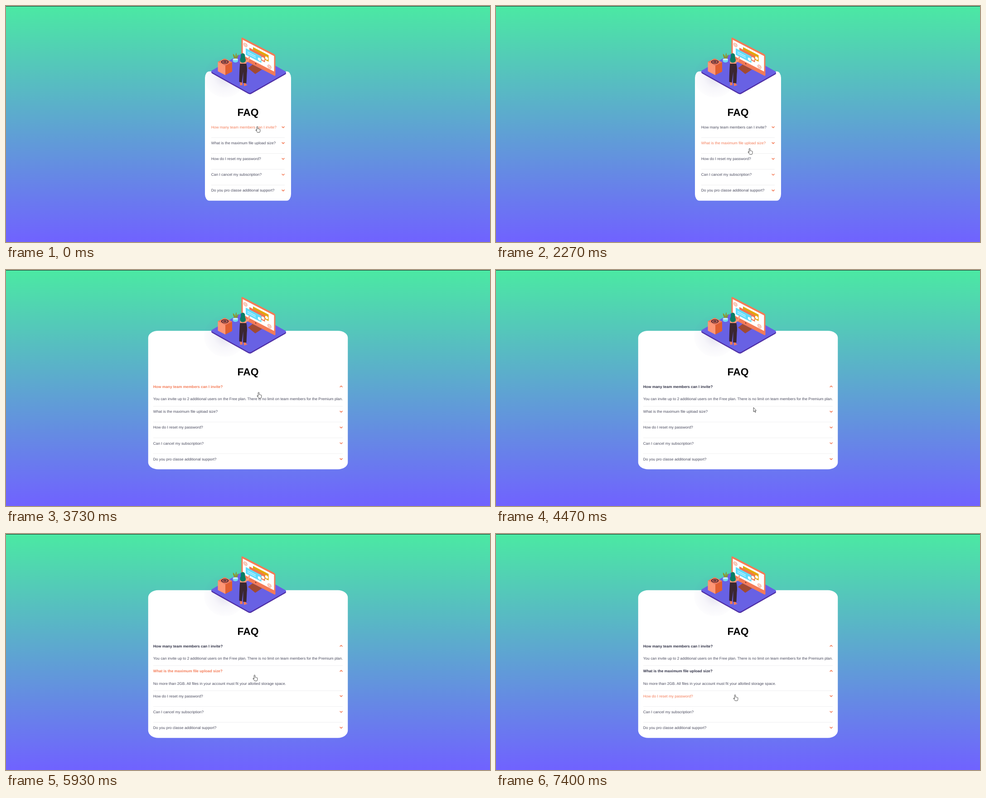
Write an HTML page that moves like this. It is 1068 px wide and 524 px high and loops after 8 s.

```html
<!DOCTYPE html>
<html lang="en">
<head>
<meta charset="utf-8">
<title>FAQ accordion</title>
<style>
  html, body { margin: 0; height: 100%; overflow: hidden; }
  svg { display: block; width: 100vw; height: 100vh; }
  text { font-family: "Liberation Sans", Arial, sans-serif; font-size: 8.36px; text-rendering: geometricPrecision; }
  .title { font-size: 22.8px; font-weight: bold; text-anchor: middle; }
  .question, .answer { fill: #4a4b5e; }
  .open { font-weight: bold; fill: #303146; }
  .hover { fill: #f47b56; }
  .rule { stroke: #e8e8ea; stroke-width: .7; }
  .chevron { fill: none; stroke: #f47b56; stroke-width: 1.6; }
  .at { fill: #f47b56; font-size: 10px; font-weight: bold; text-anchor: middle; }
  .cursor { fill: #fff; stroke: #222; stroke-width: .8; stroke-linejoin: round; }
  .skin { fill: #ff9b7b; }
</style>
</head>
<body>
<svg viewBox="0 0 1068 524" preserveAspectRatio="none">
  <defs>
    <linearGradient id="sky" x2="0" y2="1">
      <stop stop-color="#4be9a3"/><stop offset="1" stop-color="#7062ff"/>
    </linearGradient>
    <radialGradient id="shade">
      <stop stop-color="#4a3a94" stop-opacity=".16"/>
      <stop offset=".55" stop-color="#5a4aa4" stop-opacity=".05"/>
      <stop offset="1" stop-color="#5a4aa4" stop-opacity=".012"/>
    </radialGradient>
  </defs>
  <rect width="1068" height="524" fill="url(#sky)"/>
  <rect width="1068" height="1" fill="#1c2b28"/>
  <rect id="card" fill="#fff"/>

  <g id="art">
    <circle cx="483" cy="157" r="46" fill="url(#shade)"/>
    <g id="platform"></g>
    <path d="M534 138L544 130 565 141 550 151Z" fill="#a24a32"/>
    <g id="monitor" transform="matrix(1 .52 0 1 519.5 69)"></g>
    <!-- plant -->
    <path d="M505 118Q500 111 501 106Q505 109 506 114Q506 108 508 103.500Q510 109 508 114Q510 109 513 108Q512 114 508 119Z" fill="#8f942b"/>
    <path d="M500.500 118V123Q506 128 512 123V118Z" fill="#72d8f0"/>
    <ellipse cx="506.300" cy="118.500" rx="5.800" ry="2" fill="#c9f2fb"/>
    <!-- box -->
    <g id="box"></g>
    <!-- visitor -->
    <path d="M517 168H521L522 176H516ZM525 169H529V173L533 175.500 525 178Z" fill="#f47b56"/>
    <path d="M516.500 126H530Q533 138 531.500 150L530.500 171.500 523 171 523.500 146 520.500 170 514.500 168.500Q515 138 516.500 126Z" fill="#3b2631"/>
    <path class="skin" d="M516 120Q522 115 530 119L533 120 536 111.500 538.500 113 536 122.500 530 126V128H516.500Z"/>
    <path d="M518 110Q518 105 523 105Q528 106 527.500 112Q527 115 529 119Q530 126 522 126Q515 125 516.500 118Q518.500 114 518 110Z" fill="#087e66"/>
  </g>

  <text id="title" class="title" x="534">FAQ</text>
  <g id="list"></g>
  <path id="cursor" class="cursor"/>
</svg>

<script>
const LOOP = 8000, TICK = 200 / 3;
const HAND = "M-1.200 9V1.200a1.200 1.200 0 0 1 2.400 0V5.200q1.300-.8 1.900.4 1.300-.6 1.800.5 1.400-.3 1.400 1V9.600q0 2-1.100 3.600H.2Q-1 11.200-3.300 8.600q-.4-1.500 1-1.200z";
const ARROW = "M.3 .5V10L2.400 8 3.900 11.400 5.300 10.800 3.900 7.400H6.400Z";

const faq = [
  ["How many team members can I invite?", "You can invite up to 2 additional users on the Free plan. There is no limit on team members for the Premium plan."],
  ["What is the maximum file upload size?", "No more than 2GB. All files in your account must fit your allotted storage space."],
  ["How do I reset my password?"],
  ["Can I cancel my subscription?"],
  ["Do you pro classe additional support?"],
];

const start = { x: 554.5, y: 267.5 };
const moves = [
  { from: 0, to: 733, x: 556, y: 302 },
  { from: 1000, to: 1400, x: 560.5, y: 331 },
  { from: 1533, to: 1600, x: 560.5, y: 334 },
  { from: 2133, to: 3000, x: 557.5, y: 271.5 },
  { from: 3733, to: 4533, x: 568, y: 305 },
  { from: 4600, to: 5200, x: 548.5, y: 313 },
  { from: 6067, to: 6733, x: 530, y: 350 },
  { from: 6800, to: 7400, x: 527.5, y: 357 },
];
const clicks = [3733, 5933];

const el = id => document.getElementById(id);
const rect = (x, y, w, h, fill, more = "") =>
  `<rect x="${x}" y="${y}" width="${w}" height="${h}" fill="${fill}" ${more}/>`;

function drawArt() {
  const slab = (drop, fill) => rect(0, 0, 100, 100, fill, `rx="4" transform="matrix(.868 .49 .819 -.47 451.2 ${145 + drop})"`);
  el("platform").innerHTML = slab(2.8, "#4f2fa6") + slab(1.4, "#4f2fa6") + slab(0, "#6861e4");

  let screen = rect(0, 0, 75, 48, "#f47b56", 'rx="3"') + rect(3, 4.5, 69, 34.5, "#fff");
  screen += '<circle cx="31.500" cy="42.600" r="1.300" fill="#6b3540"/>';
  ["#e4a60c", "#f0764f", "#62dcfb"].forEach((fill, i) => {
    const x = 25.5 - 8 * i, y = 9 + 5.4 * i;
    screen += rect(x, y, 34.5, 14.5, fill);
    screen += `<circle cx="${x + 30}" cy="${y + 9}" r="3.800" fill="#fff" stroke="${fill}"/>`;
  });
  for (const y of [25.5, 29]) screen += rect(13.5, y, 18, 1, "#fff");
  for (const [x, y] of [[9, 15.5], [62, 36.5]]) screen += `<text class="at" x="${x}" y="${y}">@</text>`;
  el("monitor").innerHTML = screen;

  el("box").innerHTML =
    rect(0, 0, 16.5, 21, "#ff9674", 'transform="matrix(1 .52 0 1 467.5 124)"') +
    rect(0, 0, 15, 21, "#df5f31", 'transform="matrix(1 -.52 0 1 484 132.5)"') +
    `<g transform="matrix(1 .52 1 -.52 467.500 124)">${rect(0, 0, 16.5, 15, "#f47b56")}
      <g fill="none" stroke="#2a1a35" stroke-width="1.500"><circle cx="8" cy="7.500" r="5"/><circle cx="8" cy="7.500" r="1.800"/></g></g>`;
}

function cursorAt(t) {
  let { x, y } = start;
  for (const move of moves) {
    const left = 1 - Math.min(1, Math.max(0, (t - move.from) / (move.to - move.from)));
    const k = 1 - left * left;
    x += (move.x - x) * k;
    y += (move.y - y) * k;
  }
  return { x, y };
}

const cardTop = open => 145.2 - 10.25 * open;
const rowY = (i, open) => cardTop(open) + 123.8 + 35.1 * i + 20.5 * Math.min(i, open);

function drawList(open, hover) {
  const left = open ? 324.8 : 452.8, right = open ? 743 : 615;
  el("list").innerHTML = faq.map(([question, answer], i) => {
    const y = rowY(i, open), isOpen = i < open, dir = isOpen ? -1 : 1;
    const cls = `question${isOpen ? " open" : ""}${i === hover ? " hover" : ""}`;
    return `<text class="${cls}" x="${left}" y="${y + 3}">${question}</text>
      <path class="chevron" d="M${right - 6.3} ${y - 1.5 * dir}l2.900 ${2.9 * dir} 2.900 ${-2.9 * dir}"/>
      ${isOpen ? `<text class="answer" x="${left}" y="${y + 30.7}">${answer}</text>` : ""}
      ${i < faq.length - 1 ? `<path class="rule" d="M${left} ${rowY(i + 1, open) - 11.8}H${right}"/>` : ""}`;
  }).join("");
}

function drawPage(open, hover) {
  const top = cardTop(open);
  const width = open ? 440.5 : 190, height = 287 + 20.5 * open;
  const card = { x: 534 - width / 2, y: top, width, height, rx: width * .05, ry: height * .05 };
  for (const name in card) el("card").setAttribute(name, card[name]);
  el("art").setAttribute("transform", `translate(0 ${-10.25 * open})`);
  el("title").setAttribute("y", top + 98.8);
  drawList(open, hover);
}

let shown;
function frame(now) {
  const t = Math.floor((now % LOOP + 4) / TICK) * TICK;
  const open = clicks.filter(click => click <= t + 1).length;
  const { x, y } = cursorAt(t);
  // The pointer area of a row reaches a little above its hover area.
  const rowUnder = margin => faq.findIndex((_, i) => y > rowY(i, open) - margin && y < rowY(i, open) + 14);
  const hover = rowUnder(5), state = `${open},${hover}`;
  if (state !== shown) drawPage(open, hover);
  shown = state;
  el("cursor").setAttribute("d", rowUnder(6) < 0 ? ARROW : HAND);
  el("cursor").setAttribute("transform", `translate(${x} ${y})`);
  requestAnimationFrame(frame);
}
drawArt();
frame(performance.now());
</script>
</body>
</html>
```
